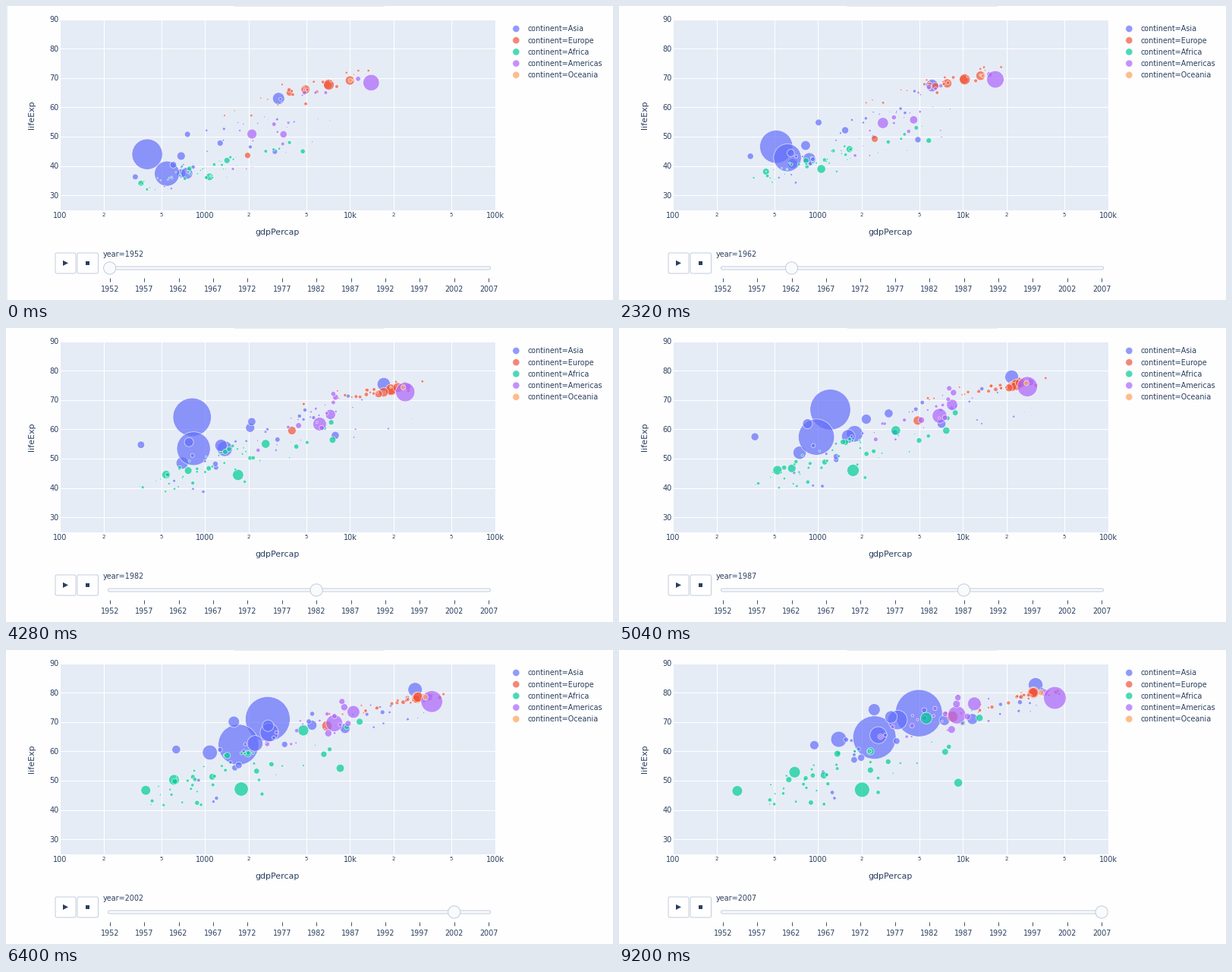
Write a matplotlib script that moves like this. It is 800 px wide and 387 px high and loops after 9680 ms.

```python
import numpy as np
import matplotlib.pyplot as plt
from matplotlib.animation import FuncAnimation
from matplotlib.patches import Circle, FancyBboxPatch, Polygon, Rectangle

W, H, DPI = 800, 387, 100
STEP, LOOP = 40, 9680
PX = 72 / DPI
INK, RIM, PALE = "#2a3f5f", "#bec8d9", "#f8fafc"
LEFT, RIGHT, TOP, BOTTOM = 71, 644.5, 17.5, 268.5
ASIA, EUROPE, AFRICA, AMERICAS, OCEANIA = TONES = (
    "#636efa", "#ef553b", "#00cc96", "#ab63fa", "#ffa15a")
YEARS = np.arange(1952, 2008, 5)
T = np.linspace(0, 1, len(YEARS))
# moment at which each five-year step begins, in ms
STARTS = np.array([1500, 2000, 2530, 3060, 3630, 4190, 4690, 5180, 5665, 6180, 6685])

rng = np.random.default_rng(11)
xs, ys, radii, colors = [], [], [], []


def px_x(gdp):
    return LEFT + 191.2 * (np.log10(gdp) - 2)


def px_y(life):
    return TOP + (90 - np.asarray(life)) * 3.862


def bubble(color, pop, gdp, life):
    """Add one path; population in millions as (first, last)."""
    xs.append(px_x(gdp))
    ys.append(px_y(life))
    radii.append(0.8537 * np.linspace(*np.sqrt(pop), len(T)))
    colors.append(color)


def trail(color, pop, *points):
    """Path through a few (gdp, life) points evenly spread over the years."""
    gdp, life = np.array(points).T
    knots = np.linspace(0, 1, len(points))
    bubble(color, pop, np.exp(np.interp(T, knots, np.log(gdp))), np.interp(T, knots, life))


def ease(k):
    return 1 - (1 - T) ** k


def between(span, u):
    return span[0] + (span[1] - span[0]) * u


def wealthy(color, pop, gdp, last=30500):
    """Rich economies converge; life expectancy follows the starting income."""
    life = 65 + 10 * np.log10(gdp / 3835)
    bubble(color, pop, gdp * (last / gdp) ** ease(1.8), between((life, 80), T))


def cluster(color, n, pop, growth, gdp, life, bend=(1, 1)):
    """Seeded small countries: richer ones live longer, with some scatter."""
    for u in (np.arange(n) + rng.random(n)) / n:
        a, b, c = np.clip(u + rng.normal(0, .18, 3), 0, 1)
        g0, g1 = (between(np.log(span), q) for span, q in zip(gdp, (u, a)))
        l0, l1 = (between(span, q) for span, q in zip(life, (b, c)))
        sway = rng.normal(0, .12) * np.sin(np.pi * T)
        p = np.exp(rng.uniform(*np.log(pop)))
        bubble(color, (p, p * growth), np.exp(between((g0, g1), ease(bend[0])) + sway),
               between((l0, l1), ease(bend[1])))


trail(ASIA, (47, 150), (684, 37.5), (650, 45), (770, 53.5), (1391, 64.1))
trail(ASIA, (556, 1319), (400, 44), (535, 46), (650, 61.5), (840, 64.7),
      (1480, 67.8), (2400, 70.7), (4959, 73))
trail(ASIA, (372, 1110), (547, 37.4), (715, 49.5), (1040, 59), (2452, 64.7))
trail(ASIA, (82, 223), (750, 37.5), (1050, 48.3), (2000, 60.6), (3541, 70.7))
trail(ASIA, (17, 69), (3035, 44.9), (8800, 54), (6800, 63.5), (11606, 71))
trail(ASIA, (86, 127), (3217, 63), (13500, 72.9), (23900, 78.9), (31656, 82.6))
trail(ASIA, (20, 48), (331, 36.3), (357, 52), (370, 58.6), (944, 62.1))
trail(ASIA, (41, 169), (685, 43.4), (1030, 51.4), (1780, 58.9), (2606, 65.5))
trail(ASIA, (22, 91), (1273, 47.8), (1950, 57.6), (2200, 64.7), (3190, 71.7))
trail(ASIA, (21, 65), (758, 50.8), (1440, 59.8), (3600, 66.6), (7458, 70.6))
trail(ASIA, (26, 85), (605, 40.4), (710, 49.4), (880, 64.5), (2442, 74.2))
cluster(ASIA, 7, (1, 12), 2.6, ((1000, 4100), (18000, 46000)), ((50, 64), (76, 81)))
cluster(ASIA, 4, (.3, 3), 5, ((1800, 12000), (18000, 32000)), ((38, 52), (72, 76)), (2.5, 1.2))
cluster(ASIA, 7, (2, 10), 3, ((500, 900), (900, 2300)), ((29, 42), (44, 66)))
cluster(ASIA, 6, (1.5, 9), 3, ((1000, 4100), (1700, 6000)), ((45, 57), (60, 74)), (1.6, 1.4))

for pop0, pop1, start in ((42, 61, 7030), (69, 82, 7144), (48, 58, 4931), (28, 40, 3835), (50, 61, 9980)):
    wealthy(EUROPE, (pop0, pop1), start)
trail(EUROPE, (22, 71), (1969, 43.6), (3250, 56.2), (5300, 64.4), (8458, 71.8))
cluster(EUROPE, 13, (1.5, 10), 1.2, ((3100, 14000), (21000, 45000)), ((64, 72.5), (78, 81)), (1.6, 1))
cluster(EUROPE, 10, (1.5, 20), 1.25, ((1300, 6800), (6500, 22000)), ((57, 66), (72, 76.5)), (1.7, 2))

trail(AFRICA, (14, 65), (781, 39.1), (890, 45.2), (620, 47), (278, 46.5))
trail(AFRICA, (22, 80), (1419, 41.9), (2000, 50.5), (3850, 61.5), (5581, 71.3))
trail(AFRICA, (21, 76), (362, 34.1), (555, 43), (520, 46.7), (691, 52.9))
trail(AFRICA, (33, 135), (1077, 36.3), (1040, 40.8), (1850, 45), (1620, 47.3), (2014, 46.9))
trail(AFRICA, (14, 44), (4725, 45), (7500, 53.2), (7700, 60.9), (9270, 49.3))
cluster(AFRICA, 34, (.5, 9), 4, ((330, 1700), (430, 2300)), ((31, 43), (42, 60)), (1, 1.8))
cluster(AFRICA, 12, (.4, 9), 3.5, ((900, 4500), (2600, 13000)), ((36, 48), (46, 74)), (1.3, 1.5))

trail(AMERICAS, (57, 190), (2109, 50.9), (3400, 57.2), (6850, 62.4), (6950, 67.4), (9066, 72.4))
wealthy(AMERICAS, (15, 33), 11367, 36319)
trail(AMERICAS, (30, 109), (3478, 50.8), (6400, 61.8), (8900, 69.7), (11978, 76.2))
trail(AMERICAS, (158, 301), (13990, 68.4), (20800, 70.9), (29500, 75.3), (42952, 78.2))
cluster(AMERICAS, 21, (.8, 12), 3, ((1500, 7600), (2700, 15000)), ((39, 65), (65, 79)), (1.3, 1.2))

wealthy(OCEANIA, (8.7, 20), 10040, 34435)
wealthy(OCEANIA, (2, 4.1), 10557, 25185)

xs, ys, radii = np.array(xs), np.array(ys), np.array(radii)

plt.rcParams["font.family"] = "DejaVu Sans"
fig = plt.figure(figsize=(W / DPI, H / DPI), dpi=DPI, facecolor="#fefefe")
ax = fig.add_axes([0, 0, 1, 1])
ax.set(xlim=(0, W), ylim=(H, 0))
ax.axis("off")


def text(x, y, s, size=9.6, ha="center", **kw):
    kw.setdefault("va", "baseline")
    return ax.text(x, y, s, fontsize=size * PX, color=INK, ha=ha, **kw)


def line(x, y, color, width=1, **kw):
    return ax.plot(x, y, color=color, lw=width * PX, solid_capstyle="butt", **kw)[0]


def rounded(x, y, w, h, r, face):
    ax.add_patch(FancyBboxPatch((x, y), w, h, boxstyle=f"round,pad=0,rounding_size={r}",
                                fc=face, ec=RIM, lw=.9 * PX))


# plot area, grid and axis labels
area = Rectangle((LEFT, TOP), RIGHT - LEFT, BOTTOM - TOP, fc="#e5ecf6", ec="none", zorder=0)
ax.add_patch(area)
for life in range(30, 91, 10):
    y = px_y(life)
    line((LEFT, RIGHT), (y, y), "white", zorder=1)
    text(70, y + 3.5, str(life), 9.8, "right")
for power, name in zip(range(2, 6), ("100", "1000", "10k", "100k")):
    for m in (1, 2, 5):
        x = px_x(m * 10 ** power)
        if x > RIGHT + 1:
            break
        line((x, x), (TOP, BOTTOM), "white", zorder=1)
        if m == 1:
            text(x, 279, name, 9.8)
        else:
            text(x, 277, str(m), 7)
text(358, 301, "gdpPercap", 11)
text(34, 143, "lifeExp", 11, va="center", rotation=90)
line((300, 498), (.3, .3), "#ececec")
edge = line((.7, .7), (0, H), "#dfe5ef", 1.5)

# legend
for i, name in enumerate(("Asia", "Europe", "Africa", "Americas", "Oceania")):
    y = 30 + 15.2 * i
    ax.add_patch(Circle((672.3, y), 4.6, fc=TONES[i], ec="white", lw=.8 * PX, alpha=.7))
    text(688, y + 3.4, "continent=" + name, ha="left")

# buttons and slider
rounded(65, 325, 27, 27, 2, "white")
rounded(94, 325, 27.5, 27, 2, "white")
ax.add_patch(Polygon([(75, 334.8), (75, 342), (82, 338.4)], fc=INK, ec="none"))
ax.add_patch(Rectangle((105, 336), 5, 5, fc=INK, ec="none"))
rounded(134.5, 343, 504, 4, 2, PALE)


def slot(k):
    return 136.7 + 45.4 * k


for k, year in enumerate(YEARS):
    line((slot(k), slot(k)), (357.5, 362.5), INK, .9)
    text(slot(k), 375.7, str(year))
label = text(128, 329.6, "", ha="left")
grip = Circle((slot(0), 345), 8.1, fc=PALE, ec=RIM, lw=.9 * PX, zorder=5)
ax.add_patch(grip)

dots = ax.scatter(xs[:, 0], ys[:, 0], s=1, zorder=3, alpha=.7,
                  c=colors, edgecolors="white", linewidths=.8 * PX)
dots.set_clip_path(area)
dots.set_snap(False)


def cubic(u):
    return 4 * u ** 3 if u < .5 else 1 - 4 * (1 - u) ** 3


def draw(frame):
    t = frame * STEP
    p = np.clip((t - STARTS) / 500, 0, 1).sum()
    i = min(int(p), len(YEARS) - 2)
    x, y, r = (between((a[:, i], a[:, i + 1]), p - i) for a in (xs, ys, radii))
    dots.set_offsets(np.column_stack((x, y)))
    dots.set_sizes((2 * r * PX) ** 2)

    k = int((t >= STARTS).sum())
    label.set_text(f"year={YEARS[k]}")
    moved = cubic(min((t - STARTS[k - 1]) / 90, 1)) if k else 0
    grip.set_center((slot(max(k - 1, 0) + moved), 345))
    edge.set_visible(frame == 0)
    return dots, label, grip, edge


anim = FuncAnimation(fig, draw, frames=LOOP // STEP, interval=STEP,
                     repeat=True, repeat_delay=0, blit=False)
plt.show()
```
